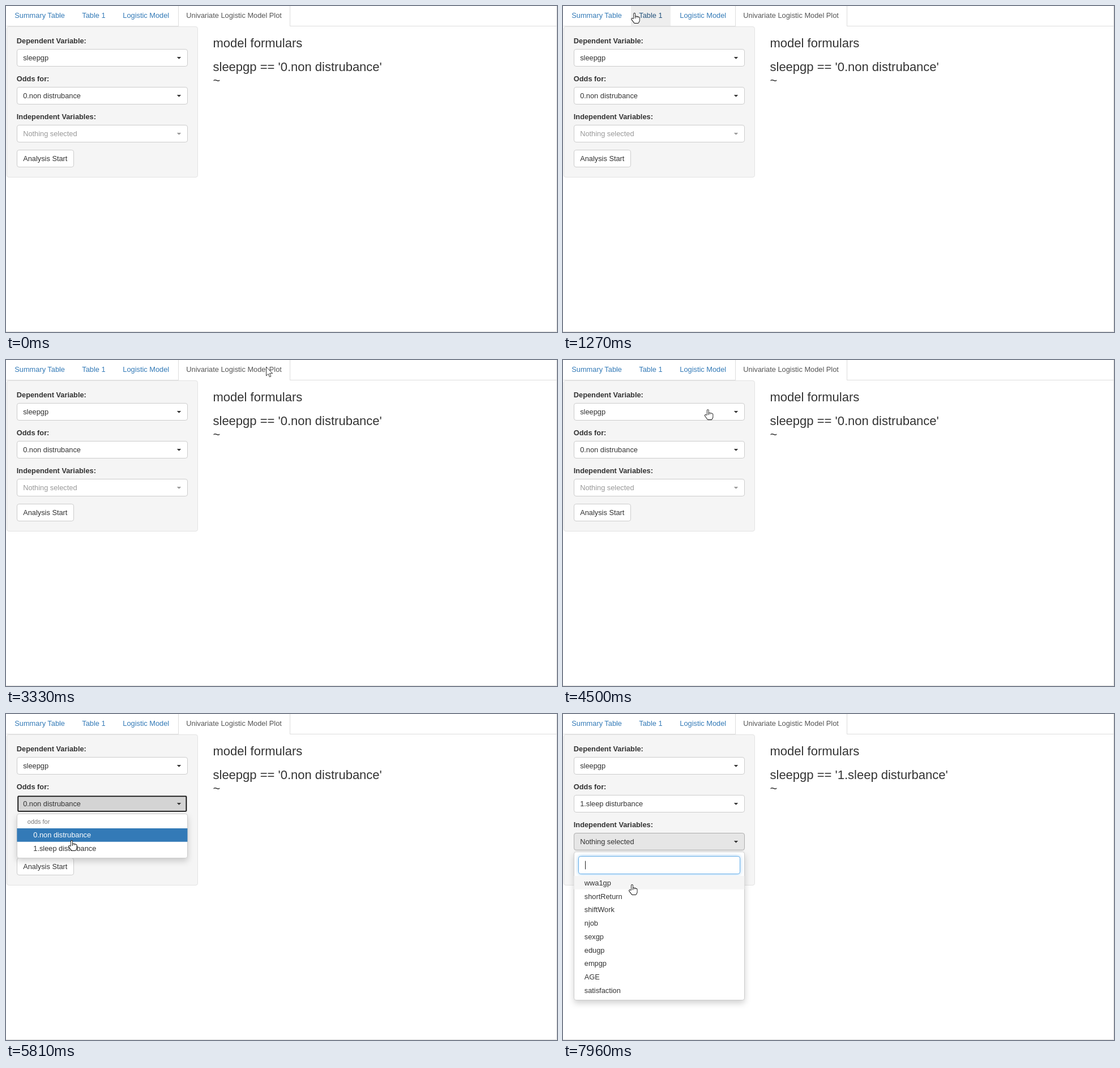
These frames come from a looping animation (973 by 576 pixels, 8000 ms). An HTML page:

```html
<!DOCTYPE html>
<html lang="en">
<head>
<meta charset="utf-8">
<style>
  html, body { margin: 0; width: 100%; height: 100%; overflow: hidden; background: #fff; }
  svg { display: block; font: 12.8px "Liberation Sans", Arial, sans-serif; }
  .label { font-weight: bold; }
  .title { font-size: 22px; }
  .small { font-size: 10.95px; }
  .menu { filter: drop-shadow(0 5px 5.5px rgba(0, 0, 0, .175)); }
  .glow { filter: drop-shadow(0 0 3px rgba(102, 175, 233, .6)); }
</style>
</head>
<body>
<svg id="stage" width="973" height="576" viewBox="0 0 973 576"></svg>
<script>
const LOOP = 8000, HOVER_LAG = 30;
const ROW = 23.77;       // menu row height
const FIELD_STEP = 67;   // distance between form fields
const [FIELD1, FIELD2, FIELD3] = [0, 1, 2].map(i => 76 + i * FIELD_STEP);
const TABS = [
  { name: 'Summary Table', x: 1, end: 118 },
  { name: 'Table 1', x: 120, end: 190 },
  { name: 'Logistic Model', x: 192, end: 303 },
  { name: 'Univariate Logistic Model Plot', x: 304, end: 502 }
];
const ODDS = ['0.non distrubance', '1.sleep disturbance'];
const VARIABLES = ['wwa1gp', 'shortReturn', 'shiftWork', 'njob', 'sexgp', 'edugp', 'empgp', 'AGE', 'satisfaction'];

// Pointer moves: from time, to time, destination
const ENTRY = { x: 909, y: 562 };
const MOVES = [
  [240, 1020, 80, 14], [1020, 1270, 126, 12], [1270, 1780, 230, 14], [1880, 2180, 366, 12],
  [2710, 3300, 463, 12], [3300, 3900, 396, 22], [3900, 4300, 409, 25],
  [4350, 4500, 256, 87], [4500, 4700, 216, 100], [4980, 5510, 151, 161],
  [5660, 5810, 116, 223], [6040, 6140, 111.6, 240.6], [7180, 7400, 120, 226], [7760, 7960, 122, 301]
];

const ARROW = 'M0 0V15.4L3.6 12.1L6 17.4L8.3 16.4L6 11.2H10.8Z';
const HAND = 'M0 2V15M3 7.5V15M5.5 8V15M7.6 9V14L6 17H.5L-4 11';
const BEAM = 'M-3-8H3M0-8V8M-3 8H3';

const text = (s, x, y, fill = '#333', cls = '') =>
  `<text x="${x}" y="${y}" fill="${fill}" class="${cls}">${s}</text>`;
const rect = (x, y, w, h, fill, extra = '') =>
  `<rect x="${x}" y="${y}" width="${w}" height="${h}" fill="${fill}" ${extra}/>`;
const line = (d, stroke = '#ddd', width = 1, fill = 'none') =>
  `<path d="${d}" fill="${fill}" stroke="${stroke}" stroke-width="${width}" stroke-linecap="round" stroke-linejoin="round"/>`;
const box = (x, y, w, h, fill, stroke, cls = '') =>
  rect(x + .5, y + .5, w - 1, h - 1, fill, `rx="3.6" stroke="${stroke}" class="${cls}"`);
const title = (s, y) => text(s, 365.5, y, '#333', 'title');
const label = (s, field) => text(s, 18.8, field - 9.8, '#333', 'label');
const menu = (y, h) => box(19, y, 302, h, '#fff', '#ccc', 'menu');
const menuRow = (y, fill) => rect(19.4, y, 301, ROW, fill);

function pointerAt(t) {
  let { x, y } = ENTRY;
  for (const [from, to, toX, toY] of MOVES) {
    const k = Math.min(1, Math.max(0, (t - from) / (to - from)));
    x += (toX - x) * k;
    y += (toY - y) * k;
  }
  return { x, y };
}

const overTab = (p, tab) => p.y < 35 && p.x >= tab.x && p.x < tab.end;
const overField = (p, y) => p.x > 19 && p.x < 321 && p.y >= y && p.y < y + 31;

function drawTabs(active, p) {
  return line('M1 35.5H973') + TABS.map((tab, i) => {
    const { name, x, end } = tab;
    const on = i === active, hover = !on && overTab(p, tab);
    const back = on
      ? rect(x, 0, end - x, 36, '#fff') + line(`M${x + .5} 35.5V-2H${end - .5}V35.5`)
      : hover ? rect(x, 0, end - x, 35, '#eee') : '';
    return back + text(name, x + 14.3, 20.8, on ? '#555' : hover ? '#23527c' : '#337ab7');
  }).join('');
}

function drawSelect(y, value, fill, ink = '#333') {
  return box(19, y, 302, 31, fill, fill === '#fff' ? '#ccc' : '#adadad') +
    text(value, 30.2, y + 19.7, ink) +
    `<path d="M301.8 ${y + 14}h7.4l-3.7 3.7z" fill="${ink}"/>`;
}

const focusRing = y => rect(19.5, y + .5, 301, 30, 'none', 'rx="3" stroke="#fff"') +
  rect(21.2, y + 2.4, 297.2, 26.4, 'none', 'rx="1.5" stroke="#101010" stroke-width="1.8"');

function oddsMenu(p) {
  return menu(176, 79) + text('odds for', 37.8, 194.3, '#777', 'small') +
    menuRow(202, '#337ab7') + (p.y > 226 ? menuRow(226, '#f5f5f5') : '') +
    ODDS.map((name, i) => text(name, 48.3, 217.8 + i * ROW, i ? '#333' : '#fff')).join('');
}

function variableMenu() {
  return menu(243, 263) + box(27, 251, 286, 32, '#fff', '#66afe9', 'glow') +
    line('M39.5 260V274', '#222') + menuRow(286, '#f5f5f5') +
    VARIABLES.map((name, i) => text(name, 37.8, 302.8 + i * ROW)).join('');
}

function drawPointer(p, active, oddsOpen, listOpen) {
  const clickable = TABS.some((tab, i) => i !== active && overTab(p, tab)) ||
    [FIELD1, FIELD2, FIELD3].some(y => overField(p, y)) ||
    oddsOpen && p.y > 202 || listOpen && p.y > 283;
  const shape = clickable ? line(HAND, '#111', 3.8) + line(HAND, '#fff', 2, '#fff')
    : listOpen ? line(BEAM, '#111')
    : line(ARROW, '#222', .9, '#fff');
  return `<g transform="translate(${p.x} ${p.y})">${shape}</g>`;
}

function draw(t) {
  const p = pointerAt(t), hover = pointerAt(t - HOVER_LAG);
  const logistic = t >= 1730 && t < 2380;
  const loading = logistic && t < 1880;
  const oddsOpen = t >= 5460 && t < 6380;
  const oddsFocus = t >= 5410 && t < 7460;
  const listOpen = t >= 7510;
  const active = logistic ? 2 : 3;
  const plural = logistic ? '' : 's';

  let out = rect(0, 0, 973, 576, '#fff') + line('M972.5 0V575.5H0') + drawTabs(active, hover) +
    box(1, 36, 338, loading ? 37 : 267, '#f5f5f5', '#e3e3e3') +
    title('model formular' + plural, 73);

  if (!loading) {
    const shade = y => overField(hover, y) ? '#e6e6e6' : '#fff';
    const listHover = overField(hover, FIELD3);
    const oddsFill = oddsOpen ? '#d4d4d4' : oddsFocus ? '#e6e6e6' : shade(FIELD2);
    const listFill = listOpen ? (listHover ? '#d4d4d4' : '#e6e6e6') : shade(FIELD3);
    out += title(`sleepgp == '${ODDS[+(t >= 6710)]}'`, 115) + title('~', 139) +
      label('Dependent Variable:', FIELD1) +
      label('Odds for:', FIELD2) +
      label(`Independent Variable${plural}:`, FIELD3) +
      drawSelect(FIELD1, 'sleepgp', shade(FIELD1)) +
      drawSelect(FIELD2, ODDS[+(t >= 6380)], oddsFill) + (oddsFocus ? focusRing(FIELD2) : '') +
      drawSelect(FIELD3, 'Nothing selected', listFill, listOpen || listHover ? '#333' : '#999') +
      box(19, 254, 101, 31, '#fff', '#ccc') + text('Analysis Start', 30.2, 273.7);
  }
  if (oddsOpen) out += oddsMenu(hover);
  if (listOpen) out += variableMenu();
  if (t >= MOVES[0][0]) out += drawPointer(p, active, oddsOpen, listOpen);
  return out;
}

const stage = document.getElementById('stage');
const start = performance.now();
function tick() {
  stage.innerHTML = draw((performance.now() - start) % LOOP);
  requestAnimationFrame(tick);
}
tick();
</script>
</body>
</html>
```
